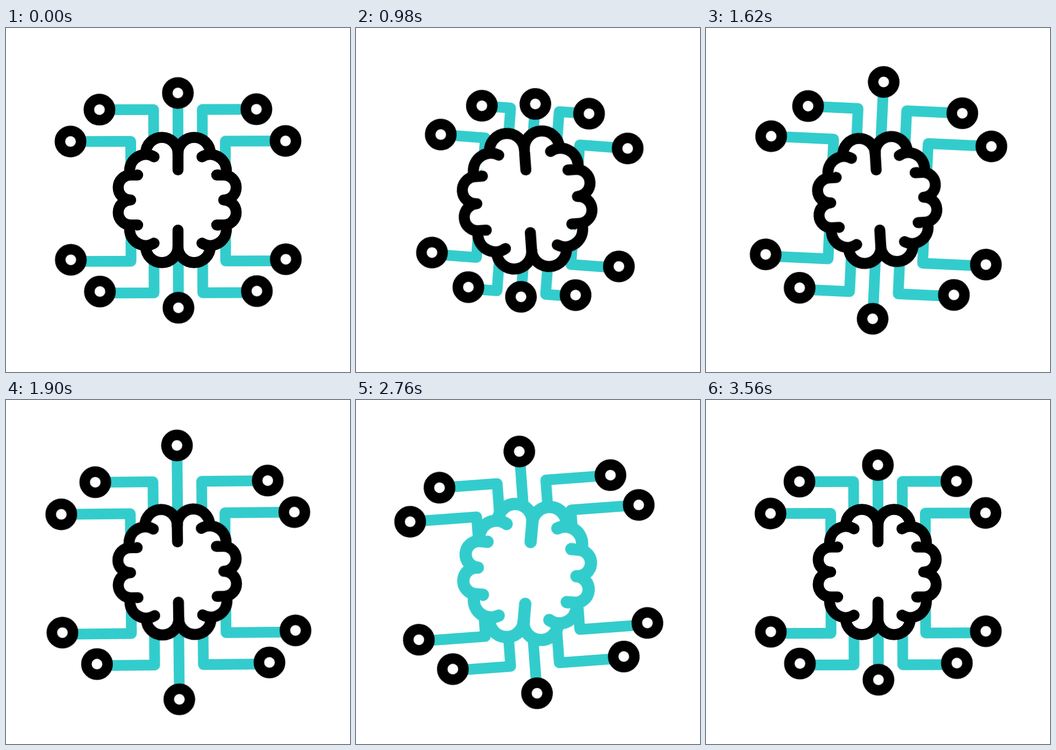
Animation, 640 px wide and 640 px high, one loop 3660 ms. Source, as an HTML page without scripts:

```html
<!DOCTYPE html>
<html lang="en">
<head>
<meta charset="utf-8">
<title>Circuit brain</title>
<style>
  @property --shift { syntax: "<length>"; inherits: true; initial-value: 0px; }
  @property --drop { syntax: "<length>"; inherits: true; initial-value: 0px; }

  html, body { margin: 0; width: 100%; height: 100%; overflow: hidden; background: #fff; }
  svg { display: block; width: 100vw; height: 100vh; }

  svg * {
    animation-duration: 3660ms;
    animation-timing-function: cubic-bezier(.333, 0, .667, 1);
    animation-iteration-count: infinite;
    transform-origin: 0 0;
  }

  /* Each wire is trimmed to the place of its node; --shift > 0 is inward. */
  .wire {
    fill: none; stroke: #3cc; stroke-width: 20; stroke-linejoin: round;
    stroke-dashoffset: var(--shift);
    transform: translateY(calc(-1 * var(--drop)));
  }
  .node {
    fill: #fff; stroke: #000; stroke-width: 19.6;
    transform: translateX(var(--shift));
  }
  .low { --drop: 3px; }

  .mid { --in: 27.9px; --out: -43.4px; animation-name: slide-mid; }
  .left { animation-name: slide-left; }
  .right { animation-name: slide-right; }
  .left.outer { --in: 36.7px; --out: -21px; }
  .left.inner { --in: 56.5px; --out: -12.1px; }
  .right.outer { --in: 27.3px; --out: -23px; }
  .right.inner { --in: 53px; --out: -32px; }

  .circuit { animation-name: spin; }
  .brain { animation-name: sway, ink; stroke-linecap: round; stroke-linejoin: round; }
  .lobes { animation-name: pulse, weight; }

  @keyframes slide-mid {
    0%, 4.5%, 95.08%, 100% { --shift: 0px; }
    18.03% { --shift: var(--in); }
    60.11% { --shift: var(--out); }
  }
  @keyframes slide-left {
    0%, 4.5%, 95.08%, 100% { --shift: 0px; }
    16.94% { --shift: var(--in); }
    59.29% { --shift: var(--out); }
  }
  @keyframes slide-right {
    0%, 4.5%, 95.9%, 100% { --shift: 0px; }
    18.85% { --shift: var(--in); }
    60.79% { --shift: var(--out); }
  }
  @keyframes spin {
    0%, 5.74%, 97.27%, 100% { transform: rotate(-.15deg); }
    33.47% { transform: rotate(5deg); }
    67.9% { transform: rotate(-5deg); }
  }
  @keyframes sway {
    0%, 6.6%, 97.27%, 100% { transform: rotate(0deg); }
    34.26% { transform: rotate(-5deg); }
    74.4% { transform: rotate(5deg); }
  }
  @keyframes pulse {
    0%, 4.92%, 42.6%, 50.7%, 88.4%, 100% { transform: scale(1); }
    19.4%, 65.2% { transform: scale(1.1115); }
  }
  @keyframes ink {
    0%, 53%, 88.4%, 100% { stroke: #000; stroke-width: 20.4px; }
    58%, 83.6% { stroke: #3cc; stroke-width: 22.8px; }
  }
  /* Counters the pulse so the outline keeps its weight on screen. */
  @keyframes weight {
    0%, 4.92%, 42.6%, 53%, 88.4%, 100% { stroke-width: 20.4px; }
    19.4% { stroke-width: 18.4px; }
    58%, 83.6% { stroke-width: 21.5px; }
  }
</style>
</head>
<body>
<svg viewBox="0 0 640 640">
  <defs>
    <g id="mid">
      <path class="wire" d="M-20 0H-260" stroke-dasharray="180 400"/>
      <circle class="node" cx="-199.8" r="19.7"/>
    </g>
    <g id="outer">
      <path class="wire" d="M-88 -40V-110H-240" stroke-dasharray="182 400"/>
      <circle class="node" cx="-200" cy="-110.1" r="19.7"/>
    </g>
    <g id="inner">
      <path class="wire" d="M-45.3 -60V-169H-200" stroke-dasharray="210 400"/>
      <circle class="node" cx="-146" cy="-169.2" r="19.7"/>
    </g>
    <path id="corner" d="M-60 -87A30 29.5 0 0 1 0 -87M-90 -48V-56A30 30 0 0 1 -44.5 -80.3"/>
  </defs>

  <g transform="translate(320.3 320.7)">
    <g class="circuit">
      <g transform="rotate(90)"><use class="mid" href="#mid"/></g>
      <g transform="rotate(-90)"><use class="mid" href="#mid"/></g>
      <g>
        <use class="left outer" href="#outer"/>
        <use class="left inner" href="#inner"/>
      </g>
      <g class="low" transform="scale(1 -1)">
        <use class="left outer" href="#outer"/>
        <use class="left inner" href="#inner"/>
      </g>
      <g transform="scale(-1 1)">
        <use class="right outer" href="#outer"/>
        <use class="right inner" href="#inner"/>
      </g>
      <g class="low" transform="scale(-1 -1)">
        <use class="right outer" href="#outer"/>
        <use class="right inner" href="#inner"/>
      </g>
    </g>
  </g>

  <g transform="translate(320 320)">
    <g class="brain" fill="#fff">
      <g class="lobes">
        <ellipse rx="92" ry="100" stroke="none"/>
        <path d="M-75 -46.5H-88A23.25 23.25 0 0 0 -88 0A23.25 23.25 0 0 0 -88 46.5H-75"/>
        <path d="M72 -46.5H85A23.25 23.25 0 0 1 85 0A23.25 23.25 0 0 1 85 46.5H72"/>
        <use href="#corner"/>
        <use href="#corner" transform="scale(-1 1)"/>
        <use href="#corner" transform="scale(1 -1)"/>
        <use href="#corner" transform="scale(-1 -1)"/>
        <path d="M0 56V87"/>
      </g>
      <path d="M0 -88V-56"/>
    </g>
  </g>
</svg>
</body>
</html>
```
